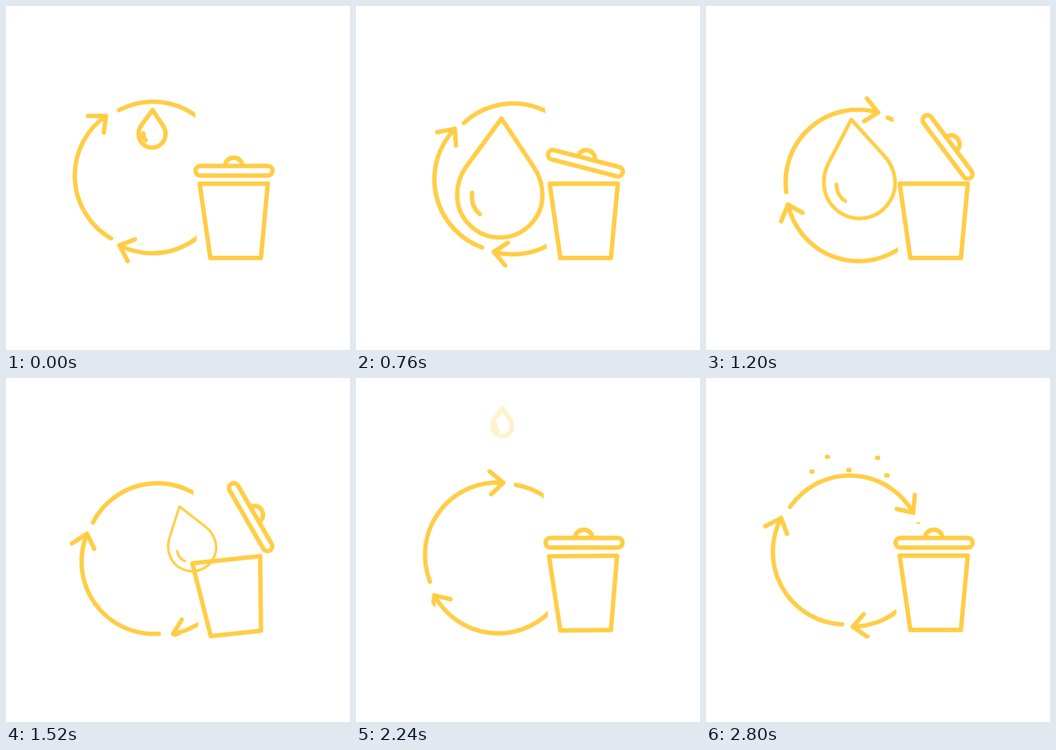
Write an HTML page that moves like this. It is 500 by 500 pixels and loops after 2840 ms.

```html
<!DOCTYPE html>
<html lang="en">
<head>
<meta charset="utf-8">
<title>Recycling loop</title>
<style>
@property --r { syntax: "<number>"; inherits: true; initial-value: 62; }

html, body { margin: 0; width: 100%; height: 100%; overflow: hidden; background: #fff; }
svg {
  position: absolute; left: 0; top: 0; width: 500px; height: 500px;
  fill: none; stroke: #ffcd45; stroke-width: 6.4px;
  stroke-linecap: round; stroke-linejoin: round;
}
.ring, .cover, .lid, .bin, .grow, .pour, .fall, .splash {
  animation: 2840ms linear infinite;
}

/* The ring turns about a point slightly off its centre. */
.ring { transform-origin: 216.8px 255.4px; animation-name: ring; }
.ring path { marker-end: url(#head); }
@keyframes ring {
  0% { transform: rotate(0deg); }
  45% { transform: rotate(180deg); }
  100% { transform: rotate(336.6deg); }
}

/* Swaying white sheet that hides the ring behind the bin. */
.cover { fill: #fff; stroke: none; transform-origin: 276.5px 275px; animation-name: cover; }
@keyframes cover {
  0%, 27% { transform: translate(0, 0) rotate(-.6deg); }
  42%, 84.5% { transform: translate(0, 0) rotate(-2deg); }
  98.5%, 100% { transform: translate(2px, 212px) rotate(-.6deg); }
}

.lid { transform-origin: 375.8px 241.7px; animation-name: lid; }
@keyframes lid {
  0%, 21% { transform: rotate(0deg); }
  45%, 65% { transform: rotate(60deg); }
  78.8%, 100% { transform: rotate(0deg); }
}

.bin { transform-origin: 382px 365px; animation-name: bin; }
@keyframes bin {
  0%, 45% { transform: rotate(0deg); }
  63.5%, 65% { transform: rotate(-13deg); }
  79.5%, 100% { transform: rotate(0deg); }
}

/* The unit drop has its tip at the origin; the line keeps its weight while r grows. */
.sized { stroke-width: calc(6.4px / var(--r)); }
.grow {
  transform: translate(calc(213.8px - var(--r) * .0376px), calc(145.4px + var(--r) * .292px))
    scale(var(--r));
  animation-name: grow;
}
@keyframes grow {
  0% { --r: 19.5; }
  21.8%, 100% { --r: 62; }
}

.pour { transform-origin: 211.5px 163.5px; animation-name: pour; }
@keyframes pour {
  0%, 34.7% { transform: translate(0, 0) rotate(0deg) scale(1); }
  42.25% { transform: translate(-.5px, 1.5px) rotate(-8.7deg) scale(.835); }
  64.8% { transform: translate(81.5px, 45px) rotate(-28.5deg) scale(.287); }
  71%, 100% { transform: translate(100px, 90px) rotate(-34deg) scale(0); }
}

.fall { --r: 14.5; animation-name: fall, fade; }
.fall { animation-timing-function: ease-in, linear; }
@keyframes fall {
  0%, 77.5% { transform: translate(212.9px, 43px) scale(14.5); }
  91.5%, 100% { transform: translate(212.9px, 100px) scale(14.5); }
}
@keyframes fade {
  0%, 77.5% { opacity: 0; }
  82.5%, 91.5% { opacity: 1; }
  91.6%, 100% { opacity: 0; }
}

.splash { transform-origin: 210px 136px; animation-name: splash; }
@keyframes splash {
  0%, 91.5% { transform: scale(0); }
  98.5%, 100% { transform: scale(1); }
}
</style>
</head>
<body>
<svg viewBox="0 0 500 500">
  <defs>
    <clipPath id="edge">
      <rect width="500" height="260"/>
      <circle cx="213" cy="253" r="127.5"/>
    </clipPath>
    <marker id="head" orient="auto" markerUnits="userSpaceOnUse" overflow="visible">
      <path d="M-21.3-14.9L0 0L-16.2 18"/>
    </marker>
    <g id="drop">
      <path d="M0 0L-.83 1.13C-.97 1.33-1.04 1.55-1.04 1.79A1 1 0 0 0 .96 1.79C.96 1.55.89 1.33.75 1.13Z"/>
      <path d="M-.69 1.74Q-.72 2.07-.51 2.24"/>
    </g>
  </defs>

  <g clip-path="url(#edge)">
    <g class="ring">
      <path d="M153 338A105.5 105.5 0 0 1 145 160"/>
      <path d="M318 259.5A105.5 105.5 0 0 1 165 348"/>
      <path d="M164 151.5A105.5 105.5 0 0 1 319 241"/>
    </g>
  </g>
  <rect class="cover" x="276.5" width="220" height="500"/>

  <g class="pour"><use class="grow sized" href="#drop"/></g>
  <use class="fall sized" href="#drop"/>
  <path class="splash" d="M153.3 136h1.4M175.8 114.6h1.4M207 134h1.6M248.8 116h1.4M262.3 141.5h1.4"/>

  <path class="bin" d="M281.5 258.3H380.5L370.5 366.3H297Z"/>
  <g class="lid">
    <rect x="275.5" y="232.5" width="112" height="14" rx="7"/>
    <path d="M318.5 232A12.5 11.5 0 0 1 343.5 232"/>
  </g>
</svg>
</body>
</html>
```
